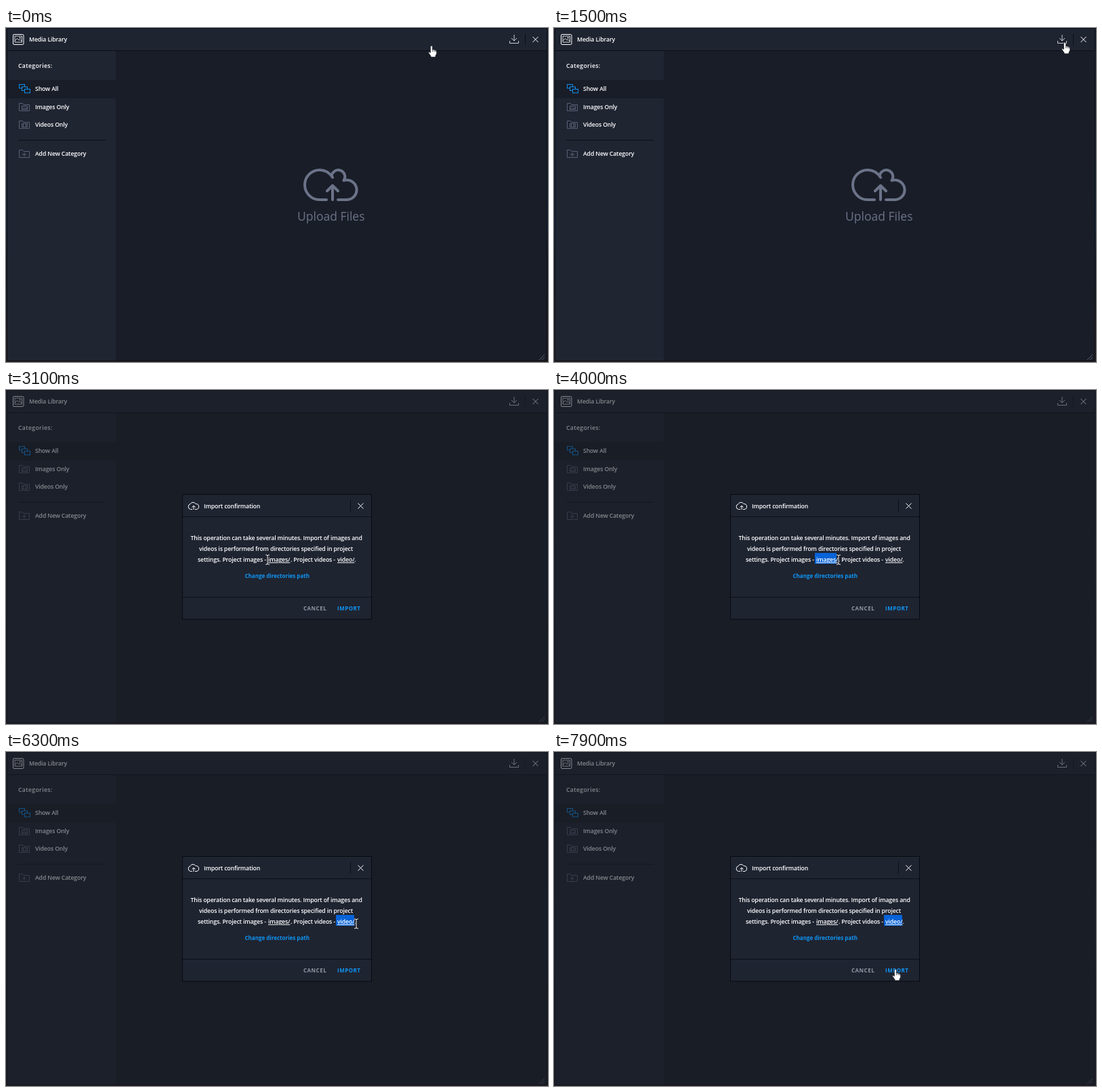
These frames come from a looping animation (800 by 494 pixels, 8 s). An HTML page:

```html
<!DOCTYPE html>
<html lang="en">
<head>
<meta charset="utf-8">
<title>Media Library</title>
<style>
html, body { margin: 0; width: 100%; height: 100%; overflow: hidden; }
body { background: linear-gradient(#1b2330, #1d2e42 60%, #171c28 70%, #2d2223); }
svg { display: block; width: 800px; height: 494px; }
text { font: 600 8.76px "Open Sans", sans-serif; letter-spacing: -.16px; fill: #fff; white-space: pre; }
.line { fill: none; stroke: #fff; }
.folder { fill: none; stroke: #596075; }
.dark { fill: none; stroke: #0c0f16; }
.cloud { fill: none; stroke: #6b7389; stroke-width: 4; stroke-linecap: round; stroke-linejoin: round; }
.spaced { letter-spacing: .3px; }
.big { font-size: 17.5px; font-weight: 400; letter-spacing: 0; fill: #6b7389; }
.button { font-size: 8px; font-weight: 700; letter-spacing: .5px; }
.link { font-size: 8px; font-weight: 700; letter-spacing: 0; }
.blue { fill: #0f96f5; }
.grey { fill: #9297a4; }
.under { text-decoration: underline; }
</style>
</head>
<body>
<svg viewBox="0 0 800 494">
  <defs>
    <path id="folder" class="folder" d="M.5 11.5V.5H5.5L7 2.5H15.5V11.5Z"/>
    <rect id="card" width="8" height="5.5" fill="#191d27" stroke="#1190ee"/>
    <path id="bar" d="M-3 -7H-1L0 -6L1 -7H3M0 -6V6M-3 7H-1L0 6L1 7H3"/>
  </defs>

  <!-- window -->
  <rect x="2" y="1" width="796" height="491" fill="#191d27"/>
  <rect x="2" y="1" width="796" height="32" fill="#1f2431"/>
  <rect x="2" y="34" width="160" height="458" fill="#202532"/>
  <rect x="2" y="77" width="160" height="27" fill="#191d27"/>
  <path class="dark" d="M1.5 .5H798.5V492.5H1.5ZM2 33.5H798M18 166H147M766.5 9V25"/>

  <!-- title bar -->
  <rect class="line" x="10.5" y="9.5" width="15.5" height="15" rx="1.5"/>
  <path class="line" stroke-width=".8" d="M13 12H23.5V21H13ZM13 19L16.5 15.5L19 18L20.5 17L23.5 19.5"/>
  <circle cx="20.7" cy="14.4" r="1" fill="#fff"/>
  <text x="34" y="20">Media Library</text>
  <path class="line" stroke-width=".9" opacity=".85" d="M750 10V19M746 15L750 19L754 15M743.5 19V22.5H756.5V19"/>
  <path class="line" d="M777.5 13L785.5 21M785.5 13L777.5 21"/>
  <path class="folder" d="M787 491L795 483M791 491L795 487"/>

  <!-- sidebar -->
  <text class="spaced" x="18" y="59">Categories:</text>
  <use href="#card" x="19.5" y="83.5"/>
  <use href="#card" x="23.5" y="87"/>
  <use href="#card" x="27.5" y="90.5"/>
  <text x="43" y="93">Show All</text>
  <use href="#folder" x="19" y="111"/>
  <path class="folder" d="M23.5 115.5H31.5V120.5H23.5ZM24 120L26.5 117.5L28.5 119.5L30 118L31.5 120"/>
  <text x="43" y="119.5">Images Only</text>
  <use href="#folder" x="19" y="137"/>
  <path class="folder" d="M23.5 141.5H31.5V146.5H23.5ZM25.5 141V147M29.5 141V147"/>
  <text x="43" y="146">Videos Only</text>
  <use href="#folder" x="19" y="180"/>
  <path class="folder" d="M24 187H30M27 184V190"/>
  <text x="43" y="189">Add New Category</text>

  <!-- drop area -->
  <path class="cloud" d="M473 254H463A22 22 0 0 1 463 210Q475 210 482 221M480.7 219A9.8 9.8 0 1 1 498.5 225.5A14.6 14.6 0 1 1 503 254H490M482 254V233M474 241L482 233L490 241"/>
  <text class="big" x="430" y="284.5">Upload Files</text>

  <g id="dialog">
    <rect width="800" height="494" fill="#191d27" opacity=".53"/>
    <rect x="260.5" y="154.5" width="279" height="184.5" fill="#1f2431" stroke="#080a10"/>
    <path class="dark" d="M261 187.5H539M261 306.5H539M508.5 162V180"/>
    <path class="line" d="M275 176.5H272.5A4 4 0 0 1 272 168.7A4.5 4.5 0 0 1 280 168.5A4 4 0 0 1 281 176.5H279M277 177V171M274.5 173.5L277 171L279.5 173.5M519.5 167.5L527.5 175.5M527.5 167.5L519.5 175.5"/>
    <text x="292" y="174.5">Import confirmation</text>
    <rect id="selection" y="241" height="16" fill="#0763d8"/>
    <text x="272.5" y="222">This operation can take several minutes. Import of images and</text>
    <text x="285" y="238">videos is performed from directories specified in project</text>
    <text x="283" y="254">settings. Project images -</text>
    <text class="under" x="387" y="254">images/</text>
    <text x="420" y="254">. Project videos -</text>
    <text class="under" x="489" y="254">video/</text>
    <text x="514" y="254">.</text>
    <text class="link blue" x="352.5" y="278">Change directories path</text>
    <text class="button grey" x="439" y="326">CANCEL</text>
    <text class="button blue" x="489" y="326">IMPORT</text>
  </g>

  <g id="cursor">
    <g id="hand" fill="#fff" stroke="#11141c" stroke-width=".7">
      <path d="M-1.6 1.5Q0 -1 1.6 1.5V6Q3 5.3 4 6.3Q5.3 5.8 6 7Q7.7 7 7.7 9V12L6 15V17H-1V15.5L-4.5 10.5Q-4.3 8.5 -1.6 10.5Z"/>
      <path d="M1.6 6V9M4 6.5V9M6 7V9.5"/>
    </g>
    <path id="arrow" d="M0 0V15L3.5 12L6 17L8.5 16L6 11H11Z" fill="#fff" stroke="#11141c" stroke-width=".8"/>
    <g id="beam" fill="none">
      <use href="#bar" stroke="#11141c" stroke-width="2.4"/>
      <use href="#bar" stroke="#fff"/>
    </g>
  </g>
</svg>
<script>
const $ = id => document.getElementById(id);
const show = (id, on) => $(id).setAttribute("display", on ? "inline" : "none");
const clamp = (v, lo, hi) => Math.max(lo, Math.min(hi, v));

// each move eases to (x, y); sag bows the way downwards
const moves = [
  { from: 400, to: 1500, x: 754, y: 21 },
  { from: 2100, to: 3100, x: 386, y: 251 },
  { from: 3400, to: 4000, x: 420, y: 251 },
  { from: 4100, to: 5100, x: 493, y: 252, sag: 10 },
  { from: 5200, to: 5500, x: 488, y: 247 },
  { from: 5500, to: 6300, x: 517, y: 254 },
  { from: 6400, to: 6900, x: 541, y: 230 },
  { from: 7200, to: 7700, x: 479, y: 324 },
  { from: 7700, to: 7900, x: 504, y: 321 }
];
const words = [
  { from: 3500, drop: 4000, to: 5500, x: 385, width: 32, letters: 6 },
  { from: 5500, drop: 6300, to: 8000, x: 487, width: 27, letters: 6 }
];

function pointer(t) {
  let x = 628, y = 26;
  for (const m of moves) {
    const u = clamp((t - m.from) / (m.to - m.from), 0, 1), e = u * u * (3 - 2 * u);
    x += (m.x - x) * e;
    y += (m.y - y) * e + (m.sag || 0) * Math.sin(Math.PI * u);
  }
  return [Math.round(x), Math.round(y)];
}

function shape(t, x, y) {
  if (t < 2200 || y > 312) return "hand";
  return x > 270 && x < 529 && y > 210 && y < 259 ? "beam" : "arrow";
}

function select(t) {
  const word = words.find(w => t >= w.from && t < w.to);
  show("selection", word);
  if (!word) return;
  const [x] = pointer(Math.min(t, word.drop));
  const step = word.width / word.letters;
  const count = clamp(Math.round((x - word.x) / step), 0, word.letters);
  $("selection").setAttribute("x", word.x);
  $("selection").setAttribute("width", count * step);
}

function draw(now) {
  const t = Math.floor(now % 8000 / 100) * 100;
  const [x, y] = pointer(t), kind = shape(t, x, y);
  show("dialog", t >= 2000);
  for (const id of ["hand", "arrow", "beam"]) show(id, id === kind);
  $("cursor").setAttribute("transform", `translate(${x} ${y})`);
  select(t);
  requestAnimationFrame(draw);
}
requestAnimationFrame(draw);
</script>
</body>
</html>
```
